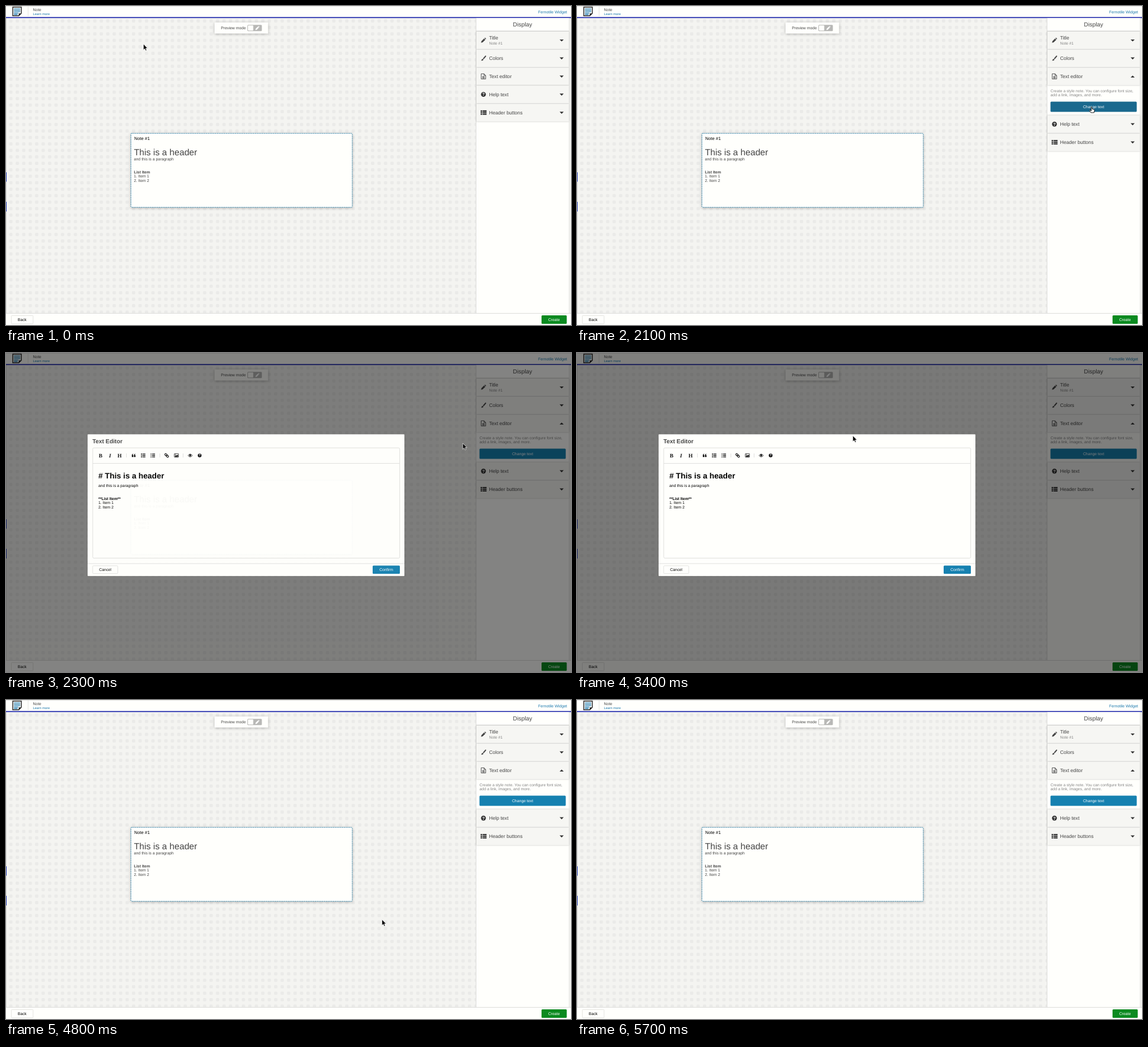
Write an HTML page that moves like this. It is 997x562 px and loops after 6000 ms.

```html
<!DOCTYPE html>
<html lang="en">
<head>
<meta charset="utf-8">
<title>Note widget editor</title>
<style>
  html, body { margin: 0; height: 100%; overflow: hidden; background: #fffffc; }
  svg { display: block; width: 100%; height: 100%; }
  text { font: 6.92px "Liberation Sans", Arial, sans-serif; fill: #444; text-rendering: geometricPrecision; white-space: pre; }
  .mid { text-anchor: middle; }
  .end { text-anchor: end; }
  .bold { font-weight: bold; }
  .link { fill: #1a78ad; }
  .soft { fill: #858585; }
  .light { fill: #fff; }
  .ink text, text.ink { fill: #000; }
  .label { font-size: 8.65px; }
  .title { font-size: 10.3px; }
  .serif text { font: bold 9.5px "Liberation Serif", "Noto Serif", serif; text-anchor: middle; fill: #111; }
  .paper { fill: #fffffc; }
  .line { fill: none; stroke: #dcdcda; }
  .button { fill: #fffffc; stroke: #dcdcda; stroke-width: .8; }
  .row { fill: #f6f6f3; }
  .shadow { filter: drop-shadow(0 .8px .8px #0004); }
  .float { filter: drop-shadow(0 1px 2.5px #0004); }
  .stroke { fill: none; stroke: #444; }
</style>
</head>
<body>
<svg viewBox="0 0 997 562" preserveAspectRatio="none">
  <defs>
    <pattern id="dots" x="5.6" y="23.5" width="11.4" height="11.4" patternUnits="userSpaceOnUse">
      <rect width="6" height="5.6" rx="1.8" fill="#eaeae8"/>
    </pattern>
    <path id="caret" d="M-3.6-1.8H3.6L0 1.9Z" fill="#333"/>
    <g id="pencil">
      <path d="M-4.2 4.2L-3.6 1.4L1.1-3.3L3.3-1.1L-1.4 3.6Z"/>
      <path d="M1.7-3.9L2.4-4.5Q3-4.8 3.5-4.3L4.3-3.5Q4.8-3 4.4-2.4L3.9-1.7Z"/>
    </g>
    <g id="help">
      <circle r="4.3"/>
      <text class="mid bold light" y="2.6" style="font-size:7.4px">?</text>
    </g>
  </defs>

  <!-- Work area -->
  <rect width="997" height="562" fill="#f4f4f1"/>
  <rect y="21" width="829" height="520" fill="url(#dots)"/>
  <path d="M.5 21V541" class="line"/>
  <path d="M.5 293V309.500M.5 345V362" stroke="#1a35b5"/>

  <!-- Top bar -->
  <rect width="997" height="20" class="paper"/>
  <path d="M0 .4H997M39 1V18" class="line" stroke-width=".8"/>
  <rect y="19.500" width="997" height="1.700" fill="#1720a8"/>
  <path d="M12 2H27V13L22.500 17.300H12Z" fill="#fffffc" stroke="#262626" stroke-width="1.500"/>
  <path d="M27 13H22.500V17.300Z" fill="#262626"/>
  <path d="M14 5.200H25M14 7.700H25M14 10.200H25M14 12.700H21.500M14 15H20.500" stroke="#1a78ad" stroke-width="1.300"/>
  <text x="47.600" y="9.400">Note</text>
  <text x="47.600" y="15.700" class="link" style="font-size:5.8px">Learn more</text>
  <text x="990" y="12.500" class="link end" style="font-size:7px">Fernotile Widget</text>

  <!-- Preview switch -->
  <rect x="368" y="29" width="94.500" height="19.500" class="paper float"/>
  <text x="379.300" y="41">Preview mode</text>
  <rect x="426" y="33.300" width="25.500" height="11" rx="1.500" fill="#b8b8b6"/>
  <rect x="427" y="34.300" width="9.300" height="9" rx="1" class="paper"/>
  <use href="#pencil" transform="translate(443.500 39) scale(.8)" fill="#fff"/>

  <!-- Note card -->
  <rect x="220" y="224" width="391" height="131" class="paper float"/>
  <rect x="220.500" y="224.400" width="390.500" height="130.200" rx="1" fill="none" stroke="#3a86ab" stroke-dasharray="2.200 1"/>
  <text x="226.300" y="235.700" class="ink" style="font-size:7.85px">Note #1</text>
  <text x="225.700" y="262.500" style="font-size:15.7px">This is a header</text>
  <text x="225.700" y="272.300">and this is a paragraph</text>
  <text x="225.700" y="294.900" class="bold">List Item</text>
  <text x="225.700" y="302.400">1. Item 1</text>
  <text x="225.700" y="309.900">2. Item 2</text>

  <!-- Side panel -->
  <rect x="829.500" y="21.200" width="164" height="520" class="paper"/>
  <path d="M829.500 21.200V541" class="line"/>
  <path d="M993.800 21.200V541" stroke="#e4e4e2"/>
  <text x="911.500" y="36.200" class="title mid">Display</text>
  <path d="M830 44.300H993.500" stroke="#d6d6d4"/>

  <text x="835.500" y="151.800" class="soft">Create a style note. You can configure font size,</text>
  <text x="835.500" y="159.200" class="soft">add a link, images, and more.</text>
  <rect id="change" x="835.500" y="168.400" width="152.200" height="18" rx="1.500"/>
  <text x="911.500" y="179.700" class="mid light">Change text</text>

  <g class="shadow">
    <rect x="830" y="44.800" width="163.500" height="31" class="row"/>
    <rect x="830" y="76.700" width="163.500" height="31" class="row"/>
    <rect x="830" y="108.600" width="163.500" height="31" class="row"/>
  </g>
  <use href="#pencil" x="842.500" y="60.500" fill="#444"/>
  <text x="852.500" y="58.700" class="label">Title</text>
  <text x="852.500" y="68.400" class="soft" style="font-size:6.77px">Note #1</text>
  <use href="#caret" x="980.500" y="60.700"/>

  <g transform="translate(842.500 92.200)">
    <path d="M3.800-3.800L.2.400" stroke="#444" stroke-width="2" stroke-linecap="round"/>
    <path d="M-4.500 3.700Q-3.200 3.600-3 2Q-1.800.3-.2 1.900Q.2 4.700-4.500 3.700Z" fill="#444"/>
  </g>
  <text x="852.500" y="95" class="label">Colors</text>
  <use href="#caret" x="980.500" y="92.400"/>

  <g transform="translate(842.500 124)" class="stroke" stroke-width=".9">
    <path d="M-4-4.600H1L4-1.700V4.600H-4ZM1-4.600V-1.700H4M-2.200.2H2.200M-2.200 1.700H2.200M-2.200 3.100H2.200"/>
  </g>
  <text x="852.500" y="127" class="label">Text editor</text>
  <use id="editorCaret" href="#caret"/>

  <g id="lowerRows">
    <rect x="830" y="140.200" width="163.500" height="63.300" class="paper"/>
    <g class="shadow">
      <rect x="830" y="140.200" width="163.500" height="31.200" class="row"/>
      <rect x="830" y="172.300" width="163.500" height="31.200" class="row"/>
    </g>
    <use href="#help" x="842.500" y="155.800" fill="#333"/>
    <text x="852.500" y="158.700" class="label">Help text</text>
    <use href="#caret" x="980.500" y="156"/>
    <path d="M837.500 184.800H840.400M841.200 184.800H848M837.500 187.700H840.400M841.200 187.700H848M837.500 190.600H840.400M841.200 190.600H848" stroke="#333" stroke-width="2.200"/>
    <text x="852.500" y="190.900" class="label">Header buttons</text>
    <use href="#caret" x="980.500" y="188"/>
  </g>

  <!-- Bottom bar -->
  <rect y="541.500" width="997" height="21" class="paper"/>
  <path d="M0 541.500H997" class="line"/>
  <rect x="9.400" y="545.400" width="38.400" height="14.400" rx="1" class="button"/>
  <text x="28.500" y="554.600" class="mid ink">Back</text>
  <rect x="945" y="545" width="44.500" height="15" rx="1.500" fill="#0b8a20"/>
  <text x="967" y="554.600" class="mid light">Create</text>

  <!-- Text editor dialog; its dimming surrounds it and fades with it -->
  <g id="dialog">
    <path d="M0 0H997V562H0ZM144 143.600V392.800H703V143.600Z" fill-rule="evenodd" fill-opacity=".5"/>
    <rect x="144" y="143.600" width="559" height="249.200" rx="1.500" class="paper"/>
    <text x="152.500" y="158.800" class="title bold">Text Editor</text>
    <rect x="153" y="167.200" width="541.700" height="194.200" rx="2" class="line" stroke-width=".9"/>
    <path d="M153 194.500H694.700M144 371H703M212.500 177V184M271.500 177V184M312.500 177V184" class="line" stroke-width=".9"/>
    <g class="serif">
      <text x="167" y="183.800">B</text>
      <text x="183.700" y="183.800" style="font-style:italic">I</text>
      <text x="200.500" y="183.800">H</text>
    </g>
    <g fill="#111" stroke="#111" stroke-width="0">
      <path id="quote" d="M222 180.700Q221.800 178 224.400 177.500V178.600Q223.500 178.900 223.500 179.900H224.700V183.300H222Z"/>
      <use href="#quote" x="3.800"/>
      <path d="M240.700 177.900H246M240.700 180.500H246M240.700 183.100H246M257.700 177.900H263M257.700 180.500H263M257.700 183.100H263" stroke-width="1.400"/>
      <path d="M238.300 177.900H239.900M238.300 180.500H239.900M238.300 183.100H239.900" stroke-width="1.600"/>
      <path d="M255.900 176.700V179M255.900 179.600V181.700M255.900 182.300V184.500" stroke-width=".9"/>
      <g transform="translate(283.500 180.500) rotate(45)" fill="none" stroke-width="1.200">
        <rect x="-4" y="-1.500" width="4.400" height="3" rx="1.500"/>
        <rect x="-.4" y="-1.500" width="4.400" height="3" rx="1.500"/>
      </g>
      <rect x="297" y="177.300" width="7.400" height="6.300" rx=".6" fill="none" stroke-width=".8"/>
      <path d="M298 182.800V181.500L299.500 180.100L300.500 181L302.300 179.100L303.600 180.500V182.800Z"/>
      <circle cx="298.900" cy="179" r=".8"/>
      <path d="M321.200 180.600Q325 175.500 328.800 180.600Q325 185.500 321.200 180.600Z" fill="none" stroke-width=".9"/>
      <circle cx="325" cy="180.200" r="1.700"/>
      <use href="#help" transform="translate(341.700 180.500) scale(.76)"/>
    </g>
    <g class="ink">
      <text x="163" y="221.200" class="bold" style="font-size:13.84px"># This is a header</text>
      <text x="163" y="236.300">and this is a paragraph</text>
      <text x="163" y="258.700" class="bold">**List Item**</text>
      <text x="163" y="266.200">1. Item 1</text>
      <text x="163" y="273.600">2. Item 2</text>
    </g>
    <rect x="152.900" y="374.800" width="44.300" height="13.800" rx="1.500" class="button"/>
    <text x="175" y="384.200" class="mid ink">Cancel</text>
    <rect id="confirm" x="647" y="374.500" width="48" height="14.400" rx="1.500"/>
    <text x="671" y="384.200" class="mid light">Confirm</text>
  </g>

  <g id="cursor" stroke-linejoin="round">
    <path id="arrow" d="M0 0V10.400L2.400 8.200L4 11.700L5.700 11L4.200 7.600H7.300Z" fill="#000" stroke="#fff" stroke-width=".7"/>
    <path id="hand" transform="translate(1.400 0)" d="M-.9 1Q0-.3.900 1V4.200L4.300 5Q5.100 5.300 5 6.300L4.200 10.600H-1.300L-3.900 7.200Q-3.700 6-2.500 6.400L-.9 7.600Z" fill="#fff" stroke="#000" stroke-width=".9"/>
  </g>
</svg>
<script>
const LOOP = 6000, STEP = 100;
const BLUE = "#1681b0", PRESSED = "#1a698e";
const el = id => document.getElementById(id);
const within = (t, from, to) => t >= from && t < to;
const smooth = p => p * p * (3 - 2 * p);

// Pointer stops: time, x, y
const stops = [
  [0, 242.5, 67], [100, 242.5, 67], [500, 897, 131],
  [600, 897, 131], [700, 897, 122], [1200, 897, 122],
  [1500, 838, 158], [1700, 917, 176], [1800, 906.8, 177.3],
  [2200, 906.8, 177.3], [2300, 806, 159],
  [2400, 715, 155], [2500, 715, 155], [2900, 465, 118.5],
  [3300, 465, 118.5], [3800, 674, 380], [3900, 661, 385.5],
  [4000, 661, 385.5], [4200, 663.4, 386.7], [4900, 663.4, 386.7],
  [5500, 14, 6], [5600, 17.5, 1.5], [LOOP, 17.5, 1.5]
];

function pointerAt(t) {
  const i = stops.findIndex(stop => stop[0] > t);
  const [t0, x0, y0] = stops[i - 1], [t1, x1, y1] = stops[i];
  const p = smooth((t - t0) / (t1 - t0));
  return [x0 + (x1 - x0) * p, y0 + (y1 - y0) * p];
}

function draw(t) {
  const opening = Math.min(1, Math.max(0, (t - 650) / 450));
  el("lowerRows").setAttribute("transform", `translate(0 ${52.3 * smooth(opening)})`);
  el("editorCaret").setAttribute("transform", `translate(980.5 124.3) scale(1 ${t < 700 ? 1 : -1})`);

  // The dialog's remaining transparency shrinks tenfold with each step.
  const opacity = within(t, 2200, 4800) ? 1 - 0.3 * 0.1 ** ((t - 2200) / STEP) : 0;
  el("dialog").setAttribute("opacity", opacity.toFixed(3));
  el("change").setAttribute("fill", within(t, 2100, 2200) ? PRESSED : BLUE);
  el("confirm").setAttribute("fill", within(t, 4600, 4800) ? PRESSED : BLUE);

  const [x, y] = pointerAt(t);
  const hand = within(t, 500, 1400) || within(t, 1700, 2200) || within(t, 4200, 4800);
  el("cursor").setAttribute("transform", `translate(${x} ${y})`);
  el("cursor").setAttribute("visibility", t < 5700 ? "visible" : "hidden");
  el("arrow").setAttribute("opacity", hand ? 0 : 1);
  el("hand").setAttribute("opacity", hand ? 1 : 0);
}

// The picture advances in tenths of a second.
function tick() {
  draw(Math.floor(performance.now() % LOOP / STEP) * STEP);
  requestAnimationFrame(tick);
}
tick();
</script>
</body>
</html>
```
